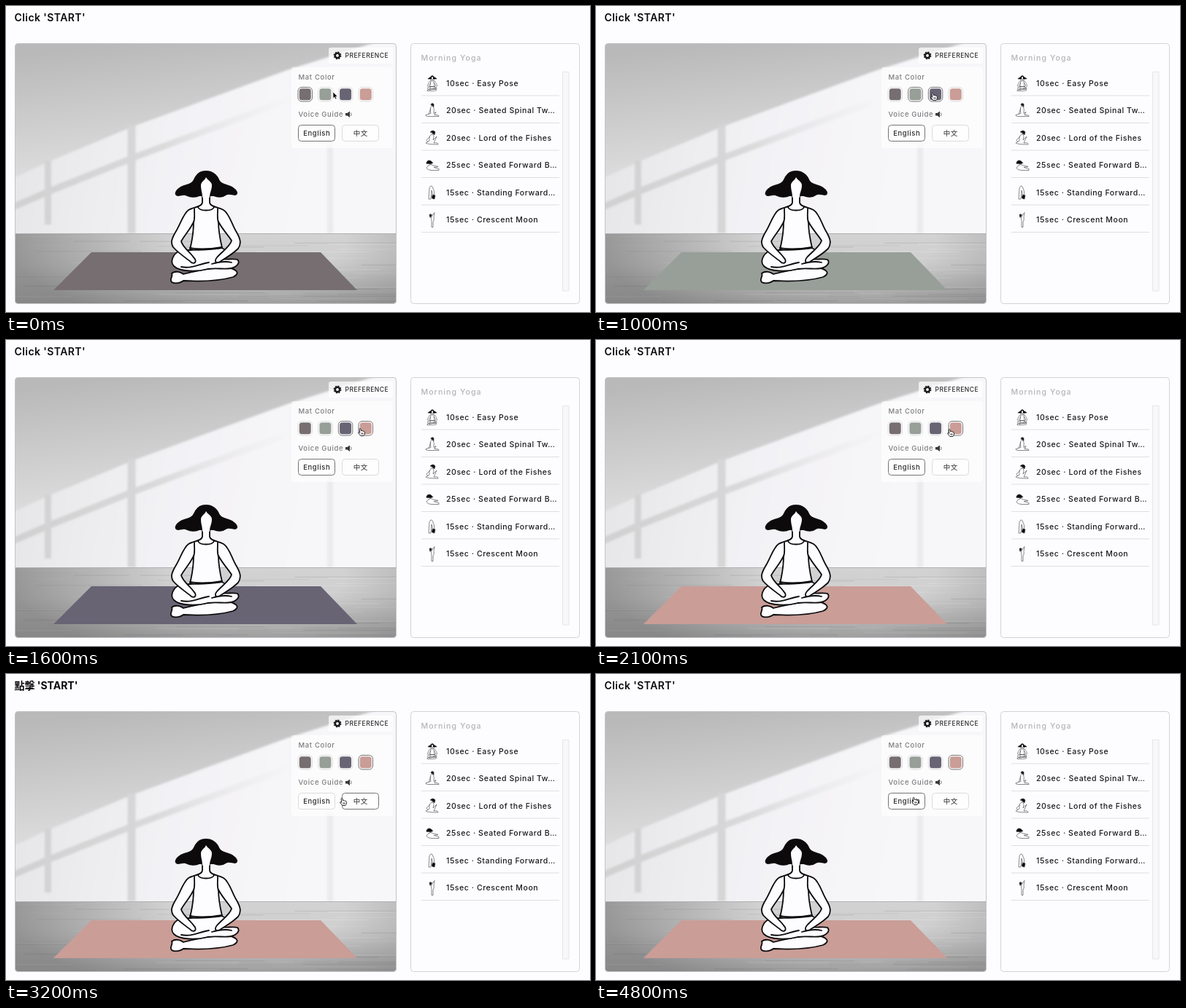
An HTML page for the animation above (5 s loop, 800 by 420 pixels).

```html
<!DOCTYPE html>
<html lang="en">
<head>
<meta charset="utf-8">
<title>Yoga preferences</title>
<style>
html, body { margin: 0; width: 100%; height: 100%; overflow: hidden; background: #fdfcff; }
svg { display: block; width: 800px; height: 420px; font-family: Inter, "Noto Sans CJK TC", "Noto Sans CJK", sans-serif; }
text { font-weight: 500; fill: #1b191c; }
.title { font-size: 14px; font-weight: 600; letter-spacing: .42px; fill: #0c0a0b; }
.title.zh { font-weight: 700; letter-spacing: 0; }
.label { font-size: 9.5px; letter-spacing: .65px; fill: #7d7b7e; }
.button { font-size: 9.5px; letter-spacing: .6px; fill: #2b292c; }
.pref { font-size: 8.5px; letter-spacing: .5px; fill: #2b292c; }
.heading { font-size: 10.5px; letter-spacing: 1.1px; fill: #b5b3b6; }
.item { font-size: 10.5px; letter-spacing: .57px; }
</style>
</head>
<body>
<svg viewBox="0 0 800 420">
  <defs>
    <linearGradient id="wall" gradientUnits="userSpaceOnUse" x1="170" y1="50" x2="190" y2="215">
      <stop offset="0" stop-color="#b9b9ba"/><stop offset=".45" stop-color="#c9c9ca"/><stop offset="1" stop-color="#dcdcdd"/>
    </linearGradient>
    <linearGradient id="light" gradientUnits="userSpaceOnUse" x1="12" y1="230" x2="400" y2="300">
      <stop offset="0" stop-color="#e6e6e8"/><stop offset=".5" stop-color="#f2f1f4"/><stop offset="1" stop-color="#f7f6f9"/>
    </linearGradient>
    <linearGradient id="floor" x1="0" y1="0" x2="0" y2="1">
      <stop offset="0" stop-color="#d2d2d3"/><stop offset=".45" stop-color="#cfcfd0"/><stop offset="1" stop-color="#b8b8b9"/>
    </linearGradient>
    <radialGradient id="shade" gradientUnits="userSpaceOnUse" cx="0" cy="0" r="1" gradientTransform="translate(345 325) scale(340 120)">
      <stop offset=".35" stop-color="#444" stop-opacity="0"/><stop offset="1" stop-color="#444" stop-opacity=".42"/>
    </radialGradient>
    <linearGradient id="fade" gradientUnits="userSpaceOnUse" x1="12" y1="0" x2="400" y2="0">
      <stop offset="0" stop-color="#d0d0d1"/><stop offset=".5" stop-color="#d9d9da"/><stop offset="1" stop-color="#ebebec" stop-opacity="0"/>
    </linearGradient>
    <filter id="soft" filterUnits="userSpaceOnUse" x="-20" y="20" width="600" height="420"><feGaussianBlur stdDeviation="1.6"/></filter>
    <clipPath id="room"><rect x="12.5" y="51.5" width="522" height="357" rx="4"/></clipPath>
    <g id="yogi" stroke="#0c0a0b" stroke-linecap="round" stroke-linejoin="round" fill="#fdfcfe">
      <path d="M227 367C232 363 239 365 243 368C262 363 283 359 300 359C316 360 322 367 311 372C290 378 262 378 243 377C238 381 227 382 226 377C225 373 229 371 227 367Z"/>
      <path d="M238 336C229 340 224 351 230 357C238 365 262 365 276 361C289 359 299 362 308 360C317 358 321 352 317 348C309 346 303 349 293 347C306 342 304 335 295 332Z"/>
      <path d="M240 358C255 361 264 354 278 352M282 354C292 351 301 350 309 352" fill="none"/>
      <path d="M269 257V270C268 276 257 276 250 280C243 285 239 299 233 309C227 319 225 325 229 331C237 340 247 346 254 352C259 355 262 350 257 345C252 338 242 331 240 323C245 314 253 306 257 296C257 310 255 322 252 334C265 336 282 334 296 332C293 319 291 309 291 296C296 306 304 314 309 322C307 330 296 337 289 345C285 350 287 354 293 351C301 346 311 340 318 333C323 326 321 319 315 309C309 299 306 285 298 280C291 276 280 276 279 270V257Z"/>
      <path d="M258 278C258 288 259 292 257 297M290 278C290 288 289 292 291 297M263 276C265 282 283 282 285 276M252 332C267 335 284 333 296 331" fill="none"/>
      <path d="M274 227C264 227 260 233 257 240C253 247 243 245 238 250C232 254 231 259 235 260C240 260 244 257 248 260C254 263 261 262 265 260L284 260C289 262 296 263 301 259C305 256 310 259 314 259C318 258 316 253 311 250C306 245 296 247 292 240C289 233 284 227 274 227Z" fill="#0c0a0b"/>
      <path d="M274 235C272 240 267 241 267 246C267 253 269 256 269 262C270 265 278 265 279 262C279 256 282 253 282 246C282 241 277 240 274 235Z" stroke="none"/>
    </g>
  </defs>

  <text id="title" class="title" x="11.5" y="21.3"></text>

  <g clip-path="url(#room)">
    <path d="M12 51H536V313H12Z" fill="url(#wall)"/>
    <g filter="url(#soft)">
      <path d="M0 241L60 213L175 165L385 88L550 36V320H0Z" fill="url(#light)"/>
      <path d="M0 280L60 254L180 206L400 124" fill="none" stroke="url(#fade)" stroke-width="9"/>
      <path d="M57.500 212V300" stroke="#d3d3d4" stroke-width="9"/>
      <path d="M172 164V312" stroke="#d6d6d7" stroke-width="11"/>
      <path d="M444 190V312" stroke="#ebebed" stroke-width="8"/>
    </g>
    <path d="M12 312H536V409H12Z" fill="url(#floor)"/>
    <g id="planks" fill="none"></g>
    <path d="M12 312H536V409H12Z" fill="url(#shade)"/>
    <path d="M12 312.500H536" stroke="#b0afb1"/>
    <path id="mat" d="M117 338H431L481 390H65Z"/>
  </g>
  <rect x="12.500" y="51.500" width="522" height="357" rx="4" fill="none" stroke="#c4c3c5"/>
  <use href="#yogi" stroke-width="1.800"/>

  <g fill="#fff">
    <rect x="442" y="57" width="88" height="22" rx="3" fill-opacity=".72"/>
    <rect x="391" y="84" width="139" height="111" rx="4" fill-opacity=".65"/>
  </g>
  <g fill="none" stroke="#1b191c">
    <circle cx="454" cy="68" r="3.200" stroke-width="2.600"/>
    <circle cx="454" cy="68" r="4.700" stroke-width="1.500" stroke-dasharray="1.900 1.790"/>
  </g>
  <text class="pref" x="464.500" y="71.200">PREFERENCE</text>
  <text class="label" x="400.500" y="101.200">Mat Color</text>
  <text class="label" x="400.500" y="152">Voice Guide</text>
  <path d="M465 147H467.500L471 144.500V153L467.500 150.500H465Z" fill="#3a383b"/>
  <path d="M472.300 146.500Q474 148.700 472.300 151" fill="none" stroke="#777"/>
  <g id="controls"></g>

  <rect x="554.500" y="51.500" width="231" height="357" rx="4" fill="none" stroke="#d3d2d5"/>
  <text class="heading" x="568.500" y="74.600">Morning Yoga</text>
  <path d="M762.500 90.500H771V391H762.500Z" fill="#f8f7f9" stroke="#e6e5e8"/>
  <g id="list"></g>

  <g id="cursor">
    <path id="arrow" d="M0 0V8.600L2 6.900L3.400 10L5 9.300L3.600 6.300H6.200Z" fill="#0c0a0b" stroke="#fff" stroke-width=".6"/>
    <path id="hand" transform="translate(-.8 .7) scale(.88)" d="M-1.200 .8C-1.200 -.5 .8 -.5 1 .8L1.500 3.500C2.300 2.800 3.200 3 3.500 3.800C4.300 3.200 5.100 3.500 5.300 4.300C6.300 3.900 7 4.500 7 5.400C7.200 8 6.800 9.500 5.500 11L.8 11.200C-.6 9.500 -2 7.800 -2.900 6.500C-3.200 5.300 -1.800 5 -.5 6.500ZM2.100 6.500V9M4.100 6.500V9" fill="#fff" stroke="#0c0a0b" stroke-linejoin="round"/>
  </g>
</svg>
<script>
const LOOP = 5000, STEP = 100;
const matColors = ['#766e70', '#979f98', '#686474', '#ca9d97'];
const langs = [
  { title: "Click 'START'", label: 'English', x: 400.5, cls: 'title' },
  { title: "點擊 'START'", label: '中文', x: 460.5, cls: 'title zh' }
];
const poses = ['10sec · Easy Pose', '20sec · Seated Spinal Tw…', '20sec · Lord of the Fishes',
  '25sec · Seated Forward B…', '15sec · Standing Forward…', '15sec · Crescent Moon'];
// Small pose drawings: head centre, hair, body outline
const thumbs = [null,
  { head: [10, 3], hair: 'M8 3Q9 0 12 2L12 6L10 4Z', body: 'M9 5Q6 7 8 15L1 17Q0 19 5 19L19 19Q20 17 13 17L15 13L12 15Q13 8 11 5ZM8 8L5 16' },
  { head: [11, 4], hair: 'M7 3Q11 -1 14 3L13 7L10 4Z', body: 'M10 6Q5 7 6 15L1 18Q3 20 18 20Q18 17 12 18L16 9L11 14Q13 9 11 6ZM7 9L2 14L4 17' },
  { head: [7, 8], hair: 'M2 7Q4 3 8 5L11 8Q7 10 5 9L2 9Z', body: 'M8 10Q3 11 2 15Q4 18 9 18L19 18L19 16L12 14L18 13L10 11Z' },
  { head: [11, 16], hair: 'M11 14L14 15L13 20Q10 20 9 18Z', body: 'M5 20L6 5Q8 0 10 3Q13 8 13 15L11 16L9 8L8 20Z' },
  { head: [8, 5], hair: 'M6 4Q8 2 9 5L7 8Z', body: 'M9 6L13 1L12 7Q13 11 11 14L11 21L9 21L9 13Q8 9 9 6Z' }
];
const matSteps = [[0, 0], [400, 1], [1100, 2], [1800, 3]];
const langSteps = [[0, 0], [2700, 1], [3900, 0]];
const path = [[0, 448, 118], [100, 443, 119], [600, 443, 119], [900, 462, 119], [1200, 462, 119],
  [1500, 486, 121], [1800, 486, 121], [2100, 485, 122], [2300, 459.5, 171], [2400, 461, 170],
  [3200, 461, 170], [3600, 436, 169], [LOOP, 436, 169]];

const $ = id => document.getElementById(id);
function add(parent, tag, attrs, text) {
  const el = document.createElementNS('http://www.w3.org/2000/svg', tag);
  for (const key in attrs) el.setAttribute(key, attrs[key]);
  if (text) el.textContent = text;
  return parent.appendChild(el);
}

let seed = 7;
const random = () => (seed = seed * 16807 % 2147483647) / 2147483647;
for (let i = 0; i < 60; i++) {
  const x = 12 + random() * 480, y = 316 + random() * 90;
  add($('planks'), 'path', {
    d: `M${x} ${y}h${40 + random() * 130}`,
    stroke: random() < .5 ? '#fff' : '#777', 'stroke-opacity': .18, 'stroke-width': .6 + random()
  });
}

const swatches = matColors.map((fill, i) => {
  const x = 400 + i * 27.67;
  const ring = add($('controls'), 'rect', { x, y: 111.5, width: 19.5, height: 19.5, rx: 5, fill: '#fff' });
  add($('controls'), 'rect', { x: x + 1.75, y: 113.25, width: 16, height: 16, rx: 3.5, fill });
  return { ring, x, y: 111.5, w: 19, h: 19.5 };
});
const buttons = langs.map(({ label, x }) => {
  const ring = add($('controls'), 'rect', { x, y: 163.5, width: 50, height: 22, rx: 4, fill: '#fff', 'fill-opacity': .75 });
  add($('controls'), 'text', { x: x + 25.3, y: 178.2, class: 'button', 'text-anchor': 'middle' }, label);
  return { ring, x, y: 163.5, w: 50, h: 22 };
});

poses.forEach((name, i) => {
  const y = 105.5 + i * 37.5, list = $('list');
  add(list, 'text', { class: 'item', x: 603, y: y + 4 }, name);
  add(list, 'path', { d: `M569 ${y + 17.5}H758`, stroke: '#dfdee1' });
  const pose = thumbs[i];
  if (!pose) {
    add(list, 'use', { href: '#yogi', 'stroke-width': 3, transform: 'translate(545.6 63.9) scale(.14)' });
    return;
  }
  const g = add(list, 'g', { transform: `translate(574 ${y - 10.5})`, stroke: '#4a484b', 'stroke-width': .65, fill: '#fff' });
  add(g, 'path', { d: pose.body });
  add(g, 'circle', { cx: pose.head[0], cy: pose.head[1], r: 1.7 });
  add(g, 'path', { d: pose.hair, fill: '#0c0a0b' });
});

const current = (steps, t) => steps.filter(s => s[0] <= t).pop()[1];
function cursorAt(t) {
  const i = path.findIndex(p => p[0] > t);
  const a = path[i - 1], b = path[i], k = (t - a[0]) / (b[0] - a[0]);
  return [a[1] + (b[1] - a[1]) * k, a[2] + (b[2] - a[2]) * k];
}

function render(t) {
  const mat = current(matSteps, t), lang = current(langSteps, t), [x, y] = cursorAt(t);
  let over = false;
  const paint = chosen => (c, i) => {
    const hit = x >= c.x && x <= c.x + c.w && y >= c.y && y <= c.y + c.h;
    over = over || hit;
    c.ring.setAttribute('stroke', hit || i === chosen ? '#757376' : '#dcdbde');
  };
  swatches.forEach(paint(mat));
  buttons.forEach(paint(lang));
  $('mat').setAttribute('fill', matColors[mat]);
  $('title').textContent = langs[lang].title;
  $('title').setAttribute('class', langs[lang].cls);
  $('cursor').setAttribute('transform', `translate(${x} ${y})`);
  $('hand').style.display = over ? '' : 'none';
  $('arrow').style.display = over ? 'none' : '';
}

const start = performance.now();
function tick() {
  const t = (performance.now() - start) % LOOP;
  render(Math.floor(t / STEP) * STEP);
  requestAnimationFrame(tick);
}
tick();
</script>
</body>
</html>
```
